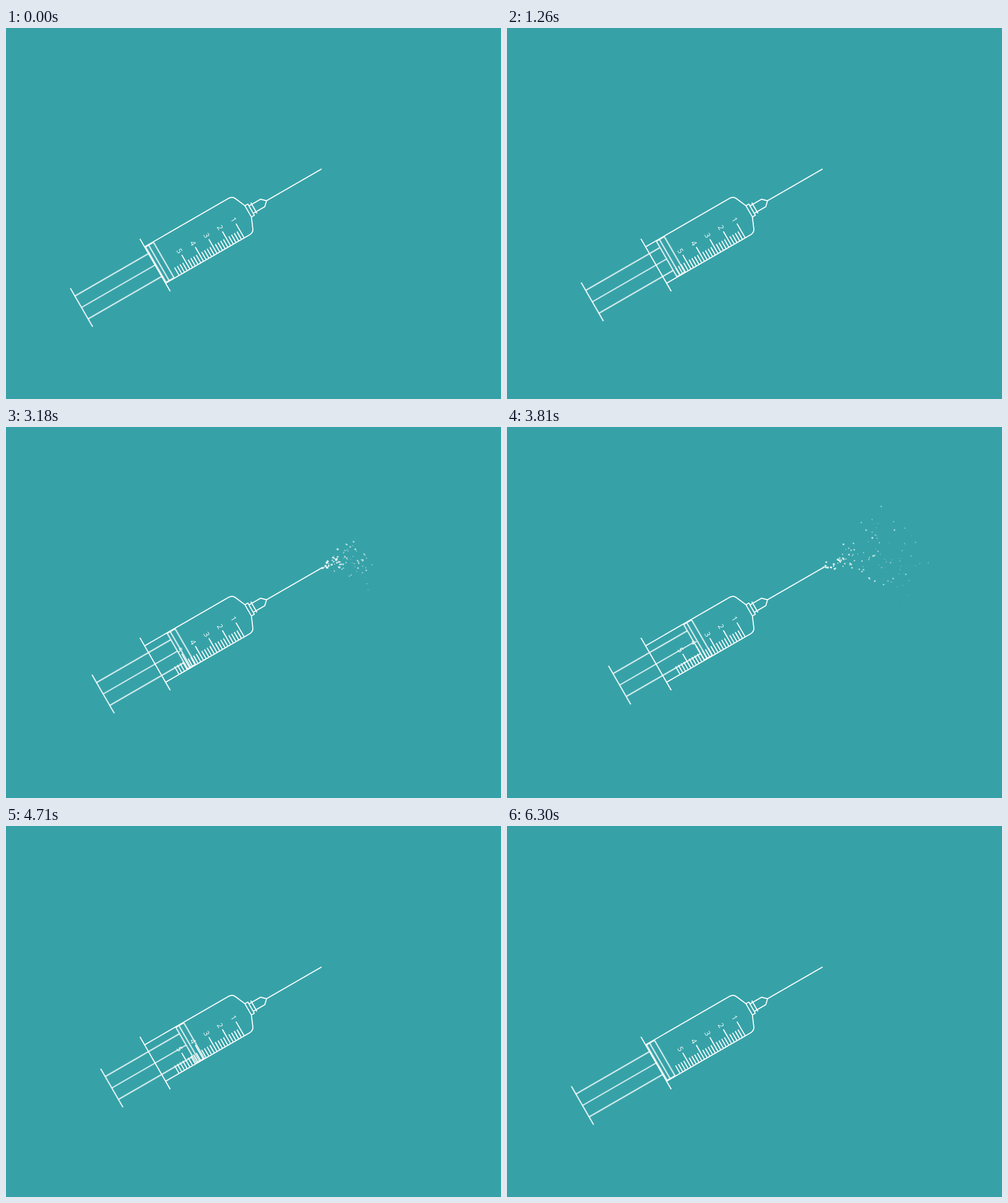
Write an HTML page with a canvas that moves like this. It is 800 px wide and 600 px high and loops after 6330 ms.

```html
<!DOCTYPE html>
<html lang="en">
<head>
<meta charset="utf-8">
<title>Syringe</title>
<style>
  html, body { margin: 0; width: 100%; height: 100%; overflow: hidden; background: #36a2a8; }
  svg, canvas { position: absolute; left: 0; top: 0; width: 800px; height: 600px; }
  .lines { fill: none; stroke: #fff; stroke-width: 1.7; stroke-linejoin: round; }
  text { font: 12px "Open Sans", sans-serif; fill: #fff; stroke: none; text-anchor: middle; }
  #plunger { animation: push 6330ms linear infinite; }
  @keyframes push {
    0% { transform: translateX(0); }
    6.32%, 42.65% { transform: translateX(18.3px); }
    61.61%, 67.14% { transform: translateX(73.3px); }
    94.79% { transform: translateX(9.8px); }
    99.53%, 100% { transform: translateX(0); }
  }
</style>
</head>
<body>
<svg viewBox="0 0 800 600">
  <!-- local origin is the needle tip, x runs along the needle -->
  <g class="lines" transform="translate(510 228) rotate(-30)">
    <path d="M0 0H-102.6"/>
    <path d="M-131 -7H-110L-102.6 0L-110 7H-131M-126.3 -10V10"/>
    <path d="M-137 -10.5H-131.5V10.5H-137Z"/>
    <path d="M-310.7 -34H-154Q-147 -34 -144.5 -28L-137 -10.5M-137 10.5L-144.5 28Q-147 34 -154 34H-310.7"/>
    <path d="M-310.7 -49V49"/>
    <g id="scale"></g>
    <g id="plunger">
      <path d="M-448 -36V36M-448 -21.3H-310M-448 0H-310M-448 21.3H-310"/>
      <path d="M-309.3 -33H-294.5V33H-309.3ZM-303.6 -33V33"/>
    </g>
  </g>
</svg>
<canvas id="spray" width="800" height="600"></canvas>
<script>
  const LOOP = 6330;
  const TIP = { x: 510, y: 228 };
  const REACH = 390, GRAVITY = 185, EVERY = 5.5;

  function buildScale() {
    let ticks = '', labels = '';
    for (let i = 0; i < 25; i++) {
      const x = -164 - i * 5.06, major = i % 5 === 0;
      ticks += `M${x} 34V${major ? 7.3 : 19.3}`;
      if (major) labels += `<text transform="translate(${x} 0) rotate(90)" y="4.3">${i / 5 + 1}</text>`;
    }
    document.getElementById('scale').innerHTML = `<path d="${ticks}"/>${labels}`;
  }

  let seed = 7;
  function random() {
    seed = (seed * 16807) % 2147483647;
    return seed / 2147483647;
  }
  const between = (a, b) => a + (b - a) * random();

  // The push builds up from startPower to full strength over 600 ms.
  function burst(start, end, startPower) {
    const drops = [];
    for (let born = start + 15; born < end; born += EVERY) {
      const power = Math.min(1, startPower + (1 - startPower) * (born - start) / 600);
      const angle = (20 + 38 * (random() + random() - 1)) * Math.PI / 180;
      const reach = REACH * power * between(0.65, 1.08);
      drops.push({
        born,
        life: Math.min(between(450, 1150), end + 850 - born),
        dx: Math.cos(angle) * reach,
        dy: -Math.sin(angle) * reach,
        radius: between(0.8, 2)
      });
    }
    return drops;
  }

  buildScale();
  const drops = [...burst(0, 400, 1), ...burst(2700, 3900, 0.55)];
  const ctx = document.getElementById('spray').getContext('2d');
  ctx.fillStyle = '#fff';

  function draw(time) {
    ctx.clearRect(0, 0, 800, 600);
    for (const drop of drops) {
      const age = time - drop.born;
      if (age < 0 || age >= drop.life) continue;
      const s = age / 1000, left = 1 - age / drop.life;
      const travel = 1 - Math.exp(-s);
      ctx.globalAlpha = 0.9 * left;
      ctx.beginPath();
      ctx.arc(TIP.x + drop.dx * travel,
              TIP.y + drop.dy * travel + GRAVITY * s * s / 2,
              drop.radius * (0.35 + 0.65 * left), 0, 2 * Math.PI);
      ctx.fill();
    }
  }

  const began = performance.now();
  function tick() {
    draw((performance.now() - began) % LOOP);
    requestAnimationFrame(tick);
  }
  tick();
</script>
</body>
</html>
```
